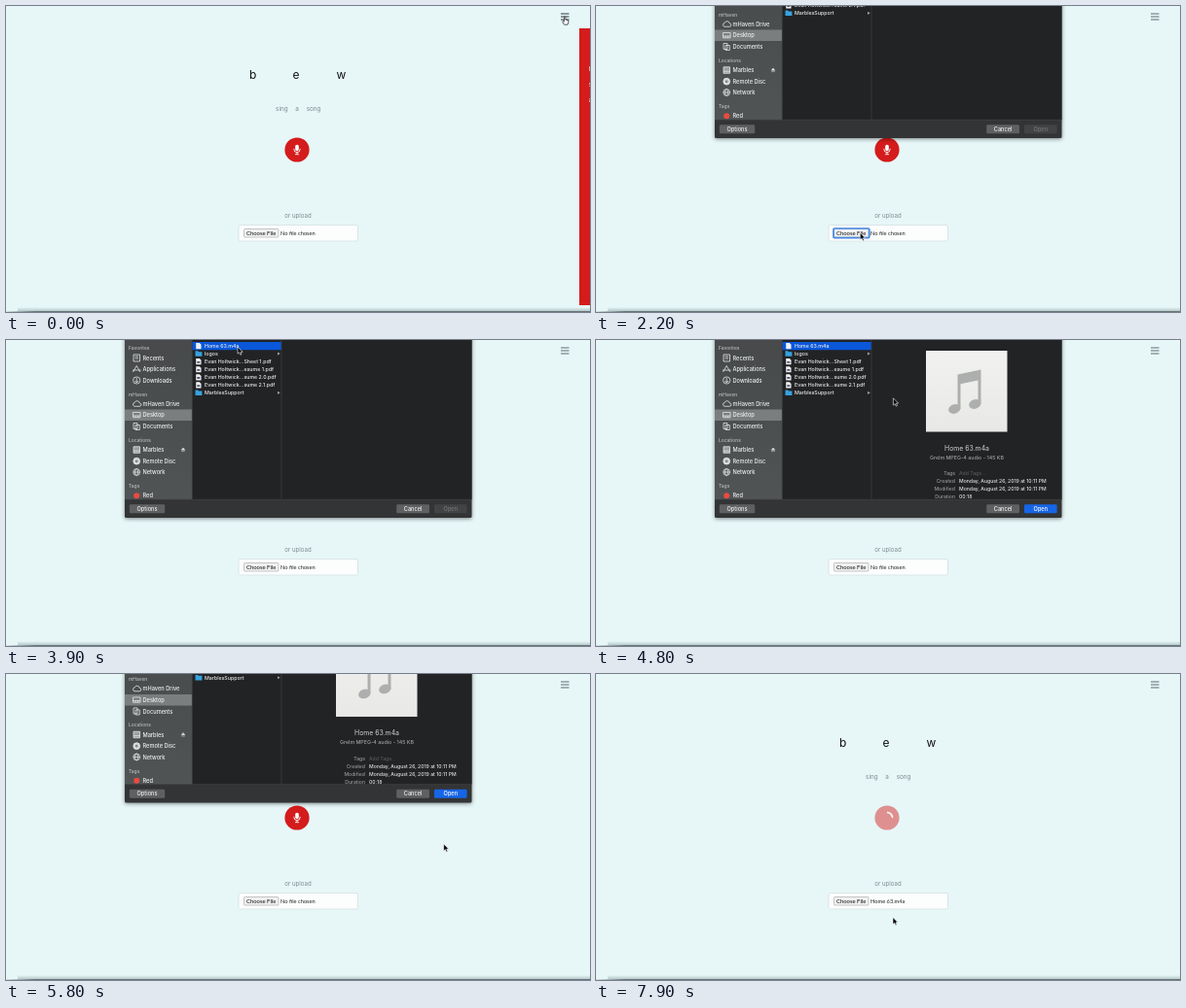
Recreate the animation shown at these times as an HTML page. Size 600 px wide and 315 px high, loop 8000 ms.

```html
<!DOCTYPE html>
<html lang="en">
<head>
<meta charset="utf-8">
<title>Song upload</title>
<style>
  html, body { margin: 0; width: 600px; height: 315px; overflow: hidden; background: #e7f7f8; }
  svg { display: block; }
  text { font-family: Inter, sans-serif; white-space: pre; }
  .page { font-family: Inter, "Open Sans", sans-serif; }
  .lato, .lato text { font-family: Lato, sans-serif; }
  #dialog { filter: drop-shadow(0 1px 2px #0007); }
  #icons { fill: none; stroke: #e4e6e6; stroke-width: .8; }
</style>
</head>
<body>
<svg width="600" height="315" viewBox="0 0 600 315">
  <defs>
    <linearGradient id="shade" x2="0" y2="1">
      <stop stop-color="#7d9294" stop-opacity="0"/><stop offset="1" stop-color="#7d9294" stop-opacity=".45"/>
    </linearGradient>
    <linearGradient id="edge">
      <stop stop-color="#68777a" stop-opacity=".15"/><stop offset=".05" stop-color="#68777a"/>
    </linearGradient>
    <linearGradient id="side" x2="0" y2="1">
      <stop stop-color="#47494a"/><stop offset="1" stop-color="#505455"/>
    </linearGradient>
    <linearGradient id="art" x2="0" y2="1">
      <stop stop-color="#f1f1ef"/><stop offset="1" stop-color="#e8e8e6"/>
    </linearGradient>
    <clipPath id="body"><path d="M122 0H478.5V164H122z"/></clipPath>
  </defs>
  <rect width="600" height="315" fill="#e7f7f8"/>
  <rect x="12" y="310" width="588" height="4" fill="url(#shade)"/>
  <rect y="314" width="600" height="1" fill="url(#edge)"/>
  <path id="menu" d="M570 8h8.5M570 11h8.5M570 14h8.5" stroke-width="1.2"/>
  <g id="page"></g>
  <g id="record">
    <circle cx="299" cy="148" r="12.6" fill="#d41c1c"/>
    <g id="mic" fill="none" stroke="#fff">
      <rect x="297.2" y="142.8" width="3.6" height="6.4" rx="1.8" fill="#fff" stroke="none"/>
      <path d="M295.9 146.8v.8a3.1 3.1 0 0 0 6.2 0v-.8M299 150.8v2M297 152.7h4" stroke-width=".9"/>
    </g>
  </g>
  <path id="spinner" d="M295.1 144.1a5.5 5.5 0 0 1 7.8 0" fill="none" stroke="#fff" stroke-width="1.5"/>
  <g class="lato">
    <rect x="239" y="225.5" width="122.5" height="16.5" rx="1.5" fill="#fcfdfd" stroke="#d3e0e1" stroke-width=".8"/>
    <rect x="244.5" y="229.5" width="35.5" height="8.5" rx=".8" fill="#f1f1f1" stroke="#b0b0b0" stroke-width=".7"/>
    <rect id="ring" x="244" y="229" width="36.8" height="9.6" rx="1" fill="none" stroke="#4488e4" stroke-width="1.7"/>
    <text x="262.2" y="235.7" font-size="5.9" text-anchor="middle" fill="#111">Choose File</text>
    <text id="file" x="282" y="235.7" font-size="5.7" fill="#222"></text>
    <g id="upload">
      <rect x="284.7" y="248.2" width="29.5" height="11.8" rx="1.5" fill="#606263"/>
      <text x="299.5" y="255.9" font-size="5.3" font-weight="700" text-anchor="middle" fill="#eee">upload</text>
    </g>
  </g>
  <g id="panel">
    <rect x="589" y="23" width="30" height="285" fill="#d41c1c"/>
    <g fill="#fff" font-size="6"><text x="598.7" y="67">home</text><text x="598.7" y="83">songs</text><text x="598.7" y="99">about</text></g>
  </g>
  <g id="dialog">
    <path d="M122-5H478.5V181.5a1.5 1.5 0 0 1-1.5 1.5H123.5a1.5 1.5 0 0 1-1.5-1.5z" fill="#333435"/>
    <path d="M122-5h69.3V164H122z" fill="url(#side)"/>
    <path d="M122 71.5h69.3V83H122z" fill="#7b7e7f"/>
    <path d="M191.3-5H478.5V164H191.3z" fill="#222324"/>
    <path d="M283-5V164M191.3-5V164M122 164.3H478.5" stroke="#414344" stroke-width=".7"/>
    <path id="row" d="M191.6 2H282.7v8.2H191.6z" fill="#0a57d9"/>
    <g id="icons">
      <path d="M131 15h6.5v7H131zM132.5 17h3.5M132.5 19h3.5"/>
      <path d="M130.5 33l3.7-6.5 3.7 6.5M130 31h8.5"/>
      <path d="M134.2 39v4.5M132.4 42l1.8 2 1.8-2"/><circle cx="134.2" cy="41.5" r="3.6"/>
      <path d="M132 68.3h5a1.7 1.7 0 0 0 .2-3.4 2.6 2.6 0 0 0-5-.5 2 2 0 0 0-.2 3.9z"/>
      <path d="M130.5 74.5h7.5v5.3h-7.5zM130.5 78h7.5M133 78v1.8M135.5 78v1.8"/>
      <path d="M131 85.5h4v6h-4zM133 87.5h4.3v5H133z"/>
      <path d="M131 109.8h6.5v6.5H131z" fill="#9b9fa0"/><path d="M131 114.2h6.5"/>
      <circle cx="134.2" cy="124.7" r="3.4" fill="#d5d8d8"/><circle cx="134.2" cy="124.7" r=".9" stroke="#555"/>
      <circle cx="134.2" cy="136" r="3.4"/><ellipse cx="134.2" cy="136" rx="1.5" ry="3.4"/><path d="M130.8 136h6.8"/>
      <path d="M180.2 113.2l1.8-2.2 1.8 2.2zM180.2 114.6h3.6" stroke-width=".5" fill="#ddd"/>
      <circle cx="134.2" cy="160.2" r="3" fill="#ea4a40" stroke="none"/>
    </g>
    <g id="labels" clip-path="url(#body)"></g>
    <g id="preview" clip-path="url(#body)">
      <rect x="339" y="11" width="83.5" height="83.5" fill="url(#art)"/>
      <g fill="#adafaf">
        <path d="M371.5 35.5L395.5 30.5V66h-3V41.5L374.5 45.3V71h-3z"/>
        <ellipse cx="368.3" cy="71" rx="6.3" ry="4.7" transform="rotate(-18 368.3 71)"/>
        <ellipse cx="389.3" cy="66" rx="6.3" ry="4.7" transform="rotate(-18 389.3 66)"/>
      </g>
    </g>
    <g id="buttons"></g>
  </g>
  <path id="arrow" d="M0 0V7.2L1.7 5.7 2.9 8.3 4.1 7.7 3 5.3H5.2z" fill="#000" stroke="#fff" stroke-width=".6"/>
  <path id="hand" d="M-.6 .4a.7 .7 0 0 1 1.4 0V3l3 .7V6L3 8.2H-.5L-2.4 5.2-1.6 4.4-.6 5.2z" fill="#fff" stroke="#111" stroke-width=".7"/>
</svg>
<script>
const $ = id => document.getElementById(id);
const NS = "http://www.w3.org/2000/svg";

function add(parent, tag, attrs, content = "") {
  const el = document.createElementNS(NS, tag);
  for (const k in attrs) el.setAttribute(k, attrs[k]);
  el.textContent = content;
  return $(parent).appendChild(el);
}
const label = (parent, str, x, y, size, fill, anchor = "start", weight = 400) =>
  add(parent, "text", { x, y, "font-size": size, fill, "text-anchor": anchor, "font-weight": weight }, str);

[["b", 253.7], ["e", 298], ["w", 344.5]].forEach(([s, x]) => label("page", s, x, 75.3, 12, "#111", "middle"));
[["sing", 283.3], ["a", 299], ["song", 316]].forEach(([s, x]) => label("page", s, x, 108.3, 6.3, "#7c8b8c", "middle"));
label("page", "or upload", 300, 218, 6.1, "#7c8b8c", "middle");

// Sidebar
[["Favorites", 8.3], ["mHaven", 56], ["Locations", 103], ["Tags", 150.5]]
  .forEach(([s, y]) => label("labels", s, 126, y + 1.9, 4.9, "#b9bcbd", "start", 500));
[["Recents", 18.5], ["Applications", 30], ["Downloads", 41.7], ["mHaven Drive", 65.7], ["Desktop", 77.2],
 ["Documents", 89], ["Marbles", 113], ["Remote Disc", 124.8], ["Network", 136.2], ["Red", 160.2]]
  .forEach(([s, y]) => label("labels", s, 140.5, y + 2.1, 5.65, "#f0f1f1", "start", 500));

// File column
const person = "Evan Holtwick";
["Home 63.m4a", "logos", person + "...Sheet 1.pdf", person + "...esume 1.pdf",
 person + "...sume 2.0.pdf", person + "...sume 2.1.pdf", "MarblesSupport"].forEach((name, i) => {
  const y = 6 + i * 8.05;
  label("labels", name, 204, y + 2, 5.25, "#eee", "start", 500);
  if (name.includes(".")) {
    add("labels", "path", { d: `M195.2 ${y - 3}h3.6l1.7 1.7v4.5h-5.3z`, fill: "#f0f2f2" });
    if (i) add("labels", "path", { d: `M196.3 ${y + .8}h3`, stroke: "#557", "stroke-width": 1.8 });
  } else {
    add("labels", "path", { d: `M194.5 ${y - 2.8}h2.6l.8 .9h3.5v4.7h-6.9z`, fill: "#35a3e0" });
    add("labels", "path", { d: `M279 ${y - 1.6}l2.8 1.6-2.8 1.6z`, fill: "#9a9c9d" });
  }
});

// Preview details
label("preview", "Home 63.m4a", 381, 113.7, 6.9, "#d2d3d3", "middle");
label("preview", "Grelm MPEG-4 audio - 145 KB", 381, 122.8, 5.3, "#9d9fa0", "middle", 500);
const day = "Monday, August 26, 2019 at 10:11 PM";
[["Tags", "Add Tags..."], ["Created", day], ["Modified", day], ["Duration", "00:18"]].forEach(([k, v], i) => {
  const y = 139.2 + i * 8.05;
  label("preview", k, 369, y, 5.1, "#97999a", "end", 500);
  label("preview", v, 373, y, 5.1, i ? "#e2e3e3" : "#57595a", "start", 500);
});

function button(str, x, w, fill, ink) {
  const box = add("buttons", "rect", { x, y: 169.3, width: w, height: 9, rx: 1.3, fill });
  return [box, label("buttons", str, x + w / 2, 175.9, 5.6, ink, "middle", 500)];
}
button("Options", 126.8, 36.4, "#5e6061", "#f0f0f0");
button("Cancel", 401.2, 33.8, "#5e6061", "#f0f0f0");
const [openBox, openText] = button("Open", 440, 33.6, "#424344", "#737576");

// Keys are [time, ...values]; values ease from one key to the next.
function at(keys, t) {
  const i = keys.findIndex(k => k[0] > t);
  if (i < 0) return keys[keys.length - 1].slice(1);
  if (!i) return keys[0].slice(1);
  const a = keys[i - 1], b = keys[i];
  const u = (t - a[0]) / (b[0] - a[0]), e = u * u * (3 - 2 * u);
  return a.slice(1).map((v, n) => v + (b[n + 1] - v) * e);
}
const pointer = [[0, 574, 11], [600, 271.3, 233.5], [2500, 271.3, 233.5], [3300, 238, 7], [4500, 238, 7],
  [5300, 451, 174], [5700, 451, 174], [6100, 442.5, 180], [6300, 442.5, 180], [7100, 305, 250.5]];
const drop = [[2000, -181.3], [2300, 0], [5700, 0], [6000, -195]];

const show = (id, on) => $(id).setAttribute("display", on ? "inline" : "none");
const move = (id, x, y) => $(id).setAttribute("transform", `translate(${x} ${y})`);

function draw(now) {
  const t = Math.floor(now % 8000 / 100) * 100;
  const within = (a, b) => t >= a && t < b;

  $("menu").setAttribute("stroke", t < 1400 ? "#333b3c" : "#606c6e");
  show("panel", t < 200);
  move("panel", t * .07, 0);

  show("dialog", within(2000, 6000));
  move("dialog", 0, at(drop, t)[0]);
  show("row", t >= 3600);
  show("preview", t >= 4200);
  const ready = t >= 4200;
  openBox.setAttribute("fill", ready ? "#1765e6" : "#424344");
  openText.setAttribute("fill", ready ? "#fff" : "#737576");

  show("ring", within(1500, 2300) || within(6000, 7100));
  $("file").textContent = t < 6000 ? "No file chosen" : "Home 63.m4a";
  show("upload", within(6100, 7200));

  const busy = t >= 7200;
  $("record").setAttribute("opacity", busy ? .47 : 1);
  show("mic", !busy);
  show("spinner", busy);
  $("spinner").setAttribute("transform", `rotate(${45 + (t - 7900) * .6} 299 148)`);

  const [x, y] = at(pointer, t);
  show("hand", t < 100);
  show("arrow", t >= 100);
  move("hand", x, y);
  move("arrow", x, y);
}
const start = performance.now();
(function tick() {
  draw(performance.now() - start);
  requestAnimationFrame(tick);
})();
</script>
</body>
</html>
```
